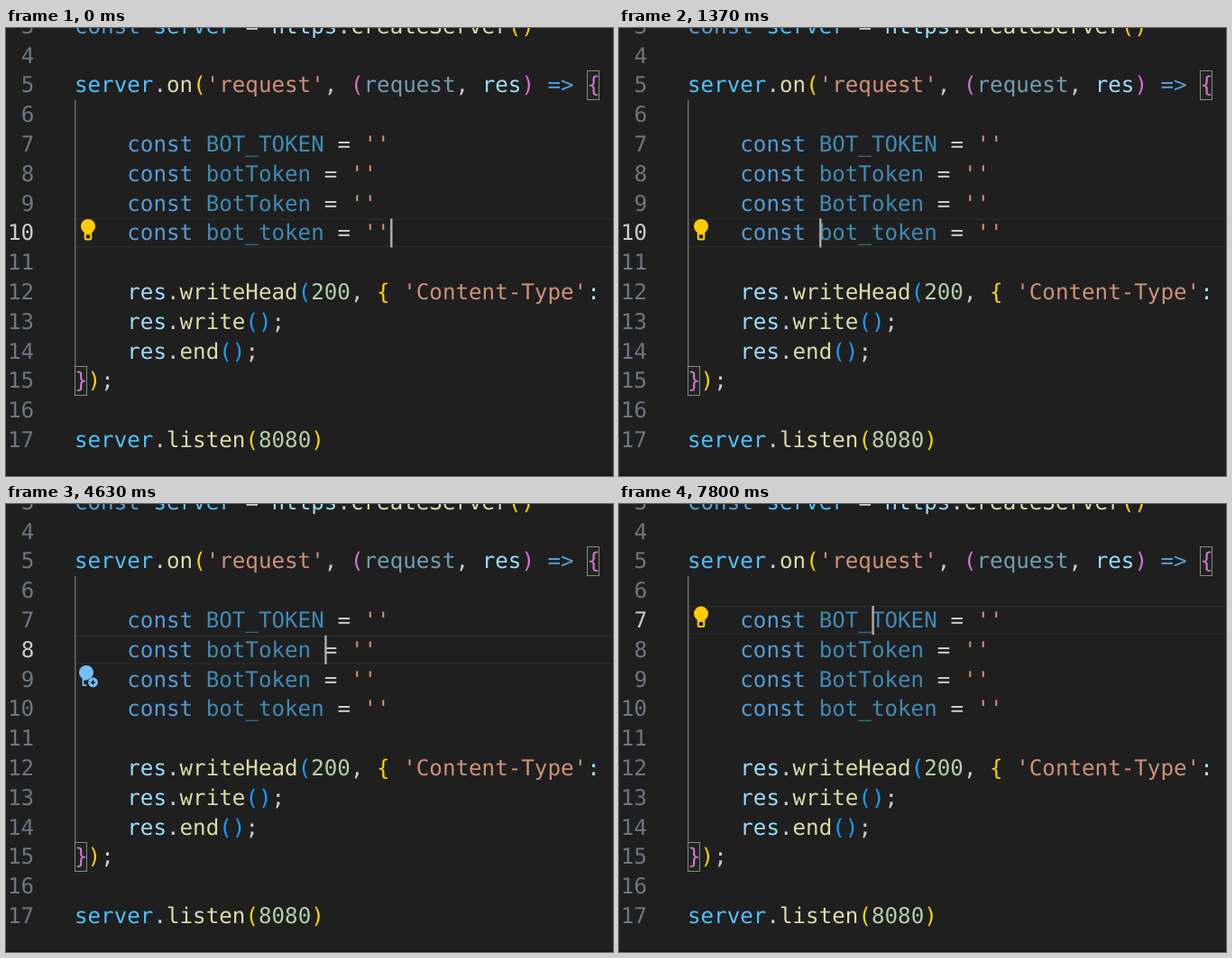
These frames come from a looping animation (673 px wide and 497 px high, 8000 ms). An HTML page:

```html
<!DOCTYPE html>
<html lang="en">
<head>
<meta charset="utf-8">
<title>Code editor</title>
<style>
html, body { margin: 0; width: 100%; height: 100%; overflow: hidden; background: #1f1f1f; }
svg { display: block; width: 100vw; height: 100vh; }
text { font: 24.2px "DejaVu Sans Mono", monospace; white-space: pre; text-rendering: geometricPrecision; }
</style>
</head>
<body>
<svg viewBox="0 0 673 497">
  <rect width="673" height="497" fill="#1f1f1f"/>
  <rect y="495" width="673" height="2" fill="#191919"/>
  <g id="row" fill="#2a2a2a">
    <rect x="76" width="597" height="1.4"/>
    <rect x="76" y="30.6" width="597" height="1.4"/>
  </g>
  <rect x="76" y="80" width="1.4" height="296" fill="#707070"/>
  <g id="marks" fill="#0064001a" stroke="#888"></g>
  <g id="code"></g>
  <g id="bulb">
    <g id="yellow">
      <circle cx="91" cy="8.6" r="8" fill="#fc0"/>
      <rect x="86.7" y="13" width="8.6" height="11" rx="2" fill="#fc0"/>
      <rect x="88.8" y="18" width="4.4" height="4" fill="#1f1f1f"/>
    </g>
    <g id="blue" fill="#75beff">
      <circle cx="89" cy="8.3" r="8"/>
      <path d="M85.500 13v9.500h4" fill="none" stroke="#75beff" stroke-width="1.8"/>
      <path d="M85 13h8l-3 4h-5z"/>
      <circle cx="96.500" cy="19.300" r="5.400"/>
      <path d="M96.500 16l1 2.300 2.300 1-2.300 1-1 2.300-1-2.300-2.300-1 2.300-1z" fill="#1f1f1f"/>
    </g>
  </g>
  <rect id="caret" width="2.400" height="32" fill="#aeafad"/>
</svg>
<script>
const NS = 'http://www.w3.org/2000/svg';
const LOOP = 8000, CELL = 14.57, LEFT = 76;
const $ = id => document.getElementById(id);
const rowY = n => 113 + (n - 7) * 32.8;
const colX = c => LEFT + c * CELL;

const colors = {
  k: '#569cd6', v: '#4fc1ff', u: '#3f8bb3', p: '#9cdcfe', q: '#729db3', f: '#dcdcaa',
  s: '#ce9178', n: '#b5cea8', t: '#cccccc', y: '#ffd700', m: '#da70d6', b: '#179fff'
};

// Each token is a color key followed by its text.
const names = { 7: 'BOT_TOKEN', 8: 'botToken', 9: 'BotToken', 10: 'bot_token' };
const declare = name => ['t    ', 'kconst', 't ', 'u' + name, 't = ', "s''"];
const call = name => ['t    ', 'pres', 't.', 'f' + name, 'b()', 't;'];
const lines = {
  3: ['kconst', 't ', 'vserver', 't = ', 'phttps', 't.', 'fcreateServer', 'y()'],
  5: ['vserver', 't.', 'fon', 'y(', "s'request'", 't, ', 'm(', 'qrequest', 't, ', 'pres', 'm)', 't ', 'k=>', 't ', 'm{'],
  12: ['t    ', 'pres', 't.', 'fwriteHead', 'b(', 'n200', 't, ', 'y{', 't ', "s'Content-Type'", 'p:'],
  13: call('write'),
  14: call('end'),
  15: ['m}', 'y)', 't;'],
  17: ['vserver', 't.', 'flisten', 'y(', 'n8080', 'y)']
};
for (const n in names) lines[n] = declare(names[n]);

function add(parent, tag, attrs, text = '') {
  const el = document.createElementNS(NS, tag);
  for (const key in attrs) el.setAttribute(key, attrs[key]);
  el.textContent = text;
  return $(parent).appendChild(el);
}

const numbers = {};
for (let n = 3; n <= 17; n++) {
  const y = rowY(n) + 24;
  numbers[n] = add('code', 'text', { x: 31.2 - CELL * String(n).length, y }, n);
  let col = 0;
  for (const token of lines[n] || []) {
    const text = token.slice(1);
    if (text.trim()) {
      const pad = text.length - text.trimStart().length;
      add('code', 'text', { x: colX(col + pad), y, fill: colors[token[0]] }, text.trim());
    }
    col += text.length;
  }
}
for (const [n, col] of [[5, 39], [15, 0]])
  add('marks', 'rect', { x: Math.round(colX(col)) + .5, y: Math.round(rowY(n)) + .5, width: 13, height: 32 });

// Columns where the caret rests, from the line end back to `const`.
const PART = 3, KEYWORD = 5;
function stops(name) {
  const equals = 10 + name.length + 1;
  const part = 10 + (name.includes('_') ? 4 : 3);
  return [equals + 4, equals + 2, equals, part, 10, 4];
}

// Walks over the stops of a line at an even pace.
const walks = [
  { line: 10, at: 265, pace: 265, from: 0, to: KEYWORD },
  { line: 9, at: 2325, pace: 205, from: 0, to: KEYWORD },
  { line: 8, at: 4110, pace: 255, from: 0, to: PART },
  { line: 8, at: 5770, pace: 265, from: 4, to: 0 },
  { line: 7, at: 6960, pace: 240, from: 0, to: PART }
];

// The bulb follows to a new line at the name part and turns blue at the keyword.
const carets = [], bulbs = [{ at: 0, line: 10, tint: 'yellow' }];
for (const { line, at, pace, from, to } of walks) {
  const dir = Math.sign(to - from);
  for (let i = 0; i <= Math.abs(to - from); i++) {
    const stop = from + dir * i, time = at + i * pace;
    carets.push({ at: time, line, col: stops(names[line])[stop] });
    if (stop === PART && bulbs.at(-1).line !== line)
      bulbs.push({ at: time, line, tint: '' }, { at: time + 110, line, tint: 'yellow' });
    if (stop === KEYWORD) bulbs.push({ at: time + 300, line, tint: 'blue' });
  }
}
const current = (steps, t) => steps.findLast(step => step.at <= t) || steps[0];

function render(t) {
  const { line, col } = current(carets, t);
  const bulb = current(bulbs, t);
  $('row').setAttribute('transform', `translate(0 ${rowY(line)})`);
  $('caret').setAttribute('x', colX(col) + .4);
  $('caret').setAttribute('y', rowY(line));
  for (const n in numbers) numbers[n].setAttribute('fill', n == line ? '#cccccc' : '#6e7681');
  $('bulb').setAttribute('transform', `translate(0 ${rowY(bulb.line)})`);
  for (const id of ['yellow', 'blue']) $(id).setAttribute('visibility', id === bulb.tint ? 'visible' : 'hidden');
}

const begin = performance.now();
function tick() {
  render((performance.now() - begin) % LOOP);
  requestAnimationFrame(tick);
}
tick();
</script>
</body>
</html>
```
